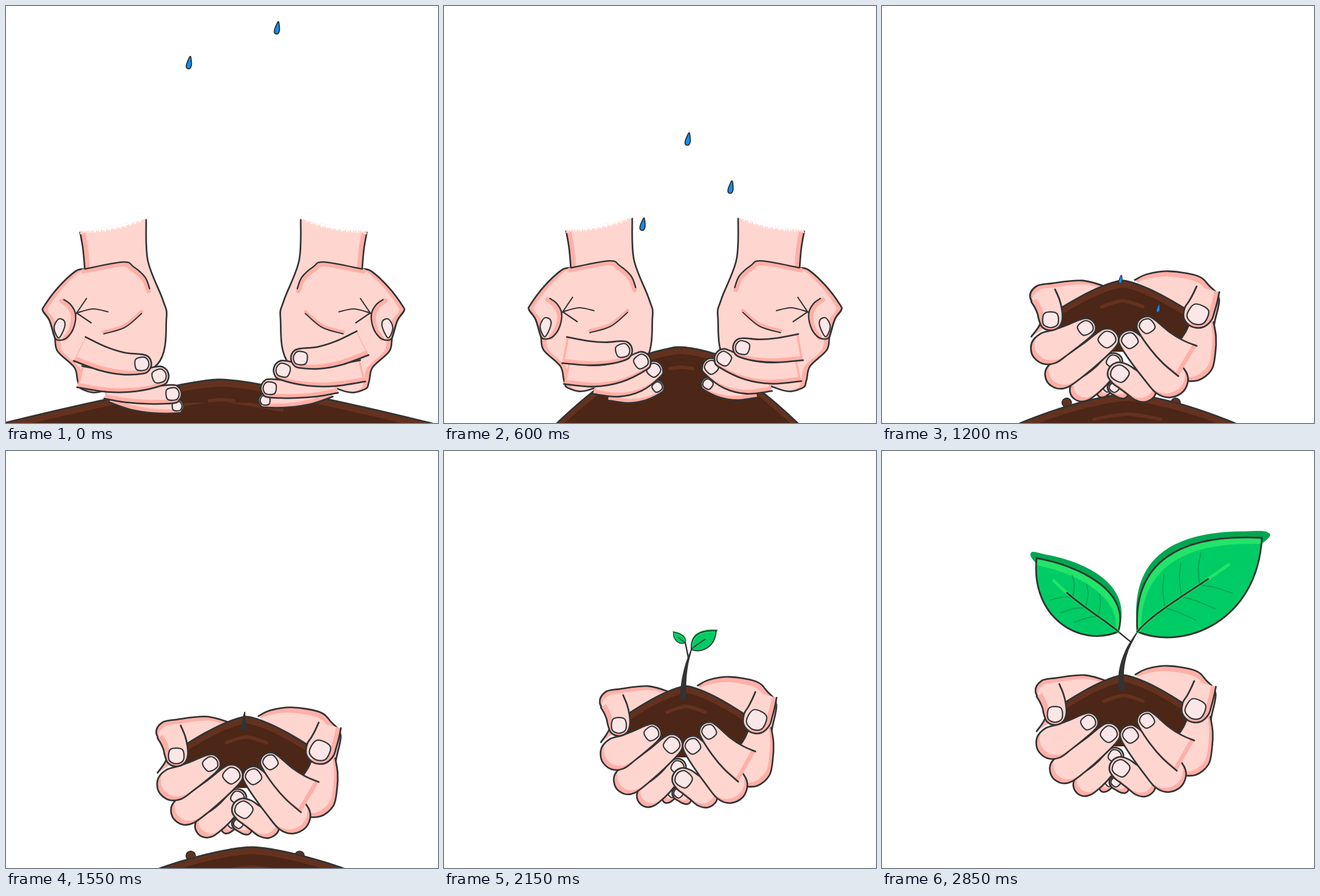
An HTML page with a canvas that plays this animation: 746x720 px, repeating every 3000 ms.

```html
<!DOCTYPE html>
<html lang="en">
<head>
<meta charset="utf-8">
<title>Seedling</title>
<style>
html, body { margin: 0; width: 100%; height: 100%; overflow: hidden; background: #fff; }
canvas { display: block; width: 100vw; height: 100vh; }
</style>
</head>
<body>
<canvas id="stage" width="746" height="720"></canvas>
<script>
const ctx = document.getElementById('stage').getContext('2d');
const INK = '#333', SKIN = '#ffd5cf', BLUSH = '#ffafa7', NAIL = '#fbe7e8';
const SOIL = '#4c2616', CLAY = '#63321f';
const GREEN = '#00cc66', LIME = '#22e468', PINE = '#00a651', BLUE = '#0a90ff';
const Q = Math.PI / 2;

// ---- time and geometry
const mix = (a, b, u) => a + (b - a) * u;
const mixPt = (a, b, u) => a.map((v, i) => mix(v, b[i], u));
const clamp = u => Math.max(0, Math.min(1, u));
const span = (n, f) => Array.from({ length: n + 1 }, (_, i) => f(i / n));
const parse = s => s.split(' ').map(p => p.split(',').map(Number));

// keys are [time, ...values]
function track(t, keys) {
  let i = 0;
  while (i < keys.length - 2 && t >= keys[i + 1][0]) i++;
  const [a, b] = [keys[i], keys[i + 1]];
  return mixPt(a, b, clamp((t - a[0]) / (b[0] - a[0]))).slice(1);
}

// smooth path through points
function curve(pts, closed) {
  const n = pts.length, path = new Path2D();
  const at = i => closed ? pts[(i + n) % n] : pts[Math.max(0, Math.min(n - 1, i))];
  path.moveTo(...pts[0]);
  for (let i = 0; i < (closed ? n : n - 1); i++) {
    const [a, b, c, d] = [at(i - 1), at(i), at(i + 1), at(i + 2)];
    path.bezierCurveTo(b[0] + (c[0] - a[0]) / 6, b[1] + (c[1] - a[1]) / 6,
      c[0] - (d[0] - b[0]) / 6, c[1] - (d[1] - b[1]) / 6, ...c);
  }
  if (closed) path.closePath();
  return path;
}

function cubic([a, b, c, d], u) {
  const v = 1 - u;
  return a.map((_, i) => v * v * v * a[i] + 3 * v * v * u * b[i] + 3 * v * u * u * c[i] + u * u * u * d[i]);
}

// ---- painting
function line(pts, width = 2.5, color = INK) {
  ctx.strokeStyle = color;
  ctx.lineWidth = width;
  ctx.stroke(curve(pts));
}

// the shade shows where the fill, moved by shift, leaves the shape uncovered
function solid(path, fill, { shade = fill, shift = [0, 0], width = 2.8 } = {}) {
  ctx.save();
  ctx.fillStyle = shade;
  ctx.fill(path);
  ctx.clip(path);
  ctx.translate(...shift);
  ctx.fillStyle = fill;
  ctx.fill(path);
  ctx.restore();
  ctx.strokeStyle = INK;
  ctx.lineWidth = width;
  if (width) ctx.stroke(path);
}

function placed(transform, draw) {
  ctx.save();
  transform();
  draw();
  ctx.restore();
}

// point on the rim of a tube whose spine runs through root, middle and tip
function rimOf([ax, ay, mx, my, bx, by], [r0, r1]) {
  const c = [2 * mx - (ax + bx) / 2, 2 * my - (ay + by) / 2];
  return (u, angle, k = 1) => {
    const p = mixPt([ax, ay], c, u), q = mixPt(c, [bx, by], u), [x, y] = mixPt(p, q, u);
    const heading = Math.atan2(q[1] - p[1], q[0] - p[0]) + angle, r = k * mix(r0, r1, u);
    return [x + r * Math.cos(heading), y + r * Math.sin(heading)];
  };
}

function tube(rim, capped) {
  const pts = [...span(3, u => rim(u, -Q)), rim(1, -Q / 2), rim(1, 0), rim(1, Q / 2), ...span(3, u => rim(1 - u, Q))];
  if (capped) pts.push(rim(0, 1.5 * Q), rim(0, 2 * Q), rim(0, 2.5 * Q));
  return curve(pts, capped);
}

function finger(spine, radii, { capped = false, nail = true, lean = 5 } = {}) {
  const rim = rimOf(spine, radii);
  solid(tube(rim, capped), SKIN, { shade: BLUSH, shift: [lean, -7] });
  if (nail) solid(curve([-2.4, -1, 0, 1, 2.4].map(a => rim(1, a, .75)), true), NAIL, { width: 2.2 });
}

// heap of soil: its sides fall away as a power of the distance from the top
function mound([x, top, half, drop, power], bottom) {
  const ridge = (lift, k) => span(16, u => {
    const v = 2 * u - 1;
    return [x + half * k * v, top + lift + drop * Math.abs(k * v) ** power];
  });
  const path = curve(ridge(0, 1)), body = new Path2D(path);
  body.lineTo(x + half, bottom);
  body.lineTo(x - half, bottom);
  solid(body, SOIL, { shade: CLAY, shift: [0, 12], width: 0 });
  line(ridge(35, .3), 6, CLAY);
  ctx.strokeStyle = INK;
  ctx.lineWidth = 3;
  ctx.stroke(path);
}

// ---- the open hands; the right one mirrors the left
const PALM = parse('128,391 133,420 136,454 136,454 120,458 90,486 66,518 64,527 75,543 84,572 89,596 118,624 124,648 132,662 170,664 262,618 277,540 271,508 245,440 242,369');
const KNUCKLE = parse('136,454 202,442 220,450 240,468 248,488');
const CREASES = ['169,566 205,555 234,531', '176,528 150,523 122,530 122,530 139,505', '122,530 147,547'].map(parse);
const THUMB = parse('100,507 112,516 120,532 117,555 106,572 93,577 84,572 75,543 64,527');
const THUMB_NAIL = parse('83,556 90,541 100,543 101,555 91,573');

// palm offset, then the mirror sums of palm and fingers and the lift of the mirrored fingers
const HANDS = [[0, 0, 0, 751, 743, -10], [600, 83, -2, 833, 824, -5], [900, 98, 1, 831, 813, -4]];
// little finger first: radii, then root, middle and tip at each time
const FINGERS = [
  [[9, 12], [0, 182, 676, 235, 690, 295, 691], [600, 285, 672, 330, 674, 368, 658], [900, 272, 667, 330, 675, 371, 662]],
  [[12, 16], [0, 172, 666, 225, 672, 287, 670], [600, 260, 658, 318, 658, 362, 629], [900, 268, 657, 327, 652, 369, 622]],
  [[19, 17], [0, 127, 640, 200, 649, 264, 639], [600, 211, 634, 280, 637, 340, 614], [900, 222, 634, 290, 632, 339, 600]],
  [[23, 17], [0, 127, 592, 185, 614, 234, 618], [600, 208, 594, 265, 600, 308, 595], [900, 222, 605, 278, 599, 317, 575]]
];

function palm() {
  solid(curve(PALM), SKIN, { shade: BLUSH, shift: [9, 0] });
  line(KNUCKLE.map(([x, y]) => [x - 2, y + 4]), 8, BLUSH);
  line(KNUCKLE);
  line(CREASES[0].map(([x, y]) => [x, y - 3]), 6, BLUSH);
  CREASES.forEach(c => line(c, 2.2));
  line(THUMB.slice(0, 5).map(([x, y]) => [x - 4, y + 2]), 8, BLUSH);
  line(THUMB);
  solid(curve(THUMB_NAIL, true), NAIL, { width: 2.2 });
  // ragged upper end of the wrist
  const [a, b] = [PALM[0], PALM[PALM.length - 1]], edge = new Path2D();
  edge.moveTo(...a);
  edge.quadraticCurveTo((a[0] + b[0]) / 2, a[1] + 3, ...b);
  ctx.fillStyle = '#fff';
  ctx.fill(edge);
  ctx.strokeStyle = SKIN;
  ctx.lineWidth = 6;
  ctx.lineCap = 'butt';
  ctx.setLineDash([3, 1, 2, 3]);
  ctx.stroke(edge);
}

function openHands(t) {
  const [dx, dy, palmSum, fingerSum, lift] = track(t, HANDS), u = clamp((t - 900) / 200);
  const pair = (sum, rise, draw) => [false, true].forEach(mirrored => placed(() => {
    if (mirrored) {
      ctx.translate(sum, rise);
      ctx.scale(-1, 1);
    }
    ctx.translate(36 * u, 10 * u);
  }, draw));
  pair(palmSum, 0, () => placed(() => ctx.translate(dx, dy), palm));
  mound(track(t, [[0, 372, 645, 70, 9, 1.5], [600, 410, 589, 66, 14, 1.5],
    [900, 410, 530, 78, 31, 1.5], [1100, 408, 495, 68, 53, 1.5]]), 685);
  pair(fingerSum, lift, () => FINGERS.forEach(([radii, ...keys]) => finger(track(t, keys), radii)));
}

// ---- the cupped hands
const BACKS = ['392,445 350,433 300,438 276,443 266,462 284,500 268,530',
  '435,432 455,422 490,417 536,425 555,442 571,465 563,510 560,560'].map(parse);
// root, middle, tip, radii
const CUP_LEFT = [
  [382, 627, 386, 624, 391, 619, 8, 9],
  [350, 622, 376, 602, 400, 573, 20, 15],
  [315, 595, 352, 569, 390, 535, 25, 19],
  [295, 550, 325, 534, 355, 515, 28, 17]
];
const CUP_RIGHT = [
  [415, 628, 409, 624, 402, 618, 9, 11],
  [448, 621, 430, 608, 411, 594, 22, 20],
  [490, 604, 457, 572, 427, 537, 31, 18],
];

function cuppedHands(t) {
  const [dx, dy, wide] = track(t, [[1400, 0, 41, 1.07], [1800, 0, 0, 1], [2150, 3, -27, 1],
    [2500, 3, -43, 1.02], [2850, 2, -46, 1.02]]);
  const gap = t < 1200 ? 8 : 0;
  const digits = (list, lean) => list.forEach(d => finger(d.slice(0, 6), d.slice(6), { capped: true, lean }));
  const left = draw => placed(() => ctx.translate(-gap, 0), draw);
  const right = draw => placed(() => ctx.translate(gap, 0), draw);
  placed(() => {
    ctx.translate(412 + dx, dy);
    ctx.scale(wide, 1);
    ctx.translate(-412, 0);
  }, () => {
    left(() => solid(curve(BACKS[0]), SKIN, { shade: BLUSH, shift: [4, 7] }));
    right(() => solid(curve(BACKS[1]), SKIN, { shade: BLUSH, shift: [-4, 9] }));
    mound([415, 433, 110, 55, 1.4], 556);
    left(() => {
      digits(CUP_LEFT, 6);
      finger([287, 459, 296, 480, 299, 500], [22, 19], { lean: 8 });
    });
    right(() => {
      finger([543, 505, 539, 537, 526, 570], [19, 37], { nail: false, lean: -6 });
      finger([553, 448, 546, 470, 537, 491], [19, 24], { lean: -7 });
      digits(CUP_RIGHT, -5);
      finger([520, 572, 486, 547, 455, 512], [30, 17], { lean: -4 });
    });
  });
}

// ---- the plant
// upper and lower edge of each leaf from foot to tip; side is where the tip points
const LEAVES = [
  { side: -1, grow: 1.2, upper: '408,312 430,240 337,197 267,185', lower: '408,312 340,340 256,286 267,185' },
  { side: 1, grow: 1, upper: '441,312 432,192 514,142 656,150', lower: '441,312 520,345 648,296 656,150' }
].map(l => ({ ...l, upper: parse(l.upper), lower: parse(l.lower) }));

function leaf({ side, upper, lower }, foot, s) {
  const up = u => cubic(upper, u), low = u => cubic(lower, u), rib = u => mixPt(up(u), low(u), .5);
  const bold = Math.min(9, 3 / s), [root, c1, c2, tip] = upper;
  const push = ([x, y], dx, dy) => [x + side * dx, y + dy];
  placed(() => {
    ctx.translate(...foot);
    ctx.scale(s, s);
    ctx.translate(-root[0], -root[1]);
  }, () => {
    const fold = [root, push(c1, -8, -12), push(c2, -8, -12), push(tip, 9, -10)];
    ctx.fillStyle = PINE;
    ctx.fill(curve([...span(12, u => cubic(fold, u)), push(tip, 0, 10), rib(.5)]));
    const blade = new Path2D();
    blade.moveTo(...root);
    blade.bezierCurveTo(...c1, ...c2, ...tip);
    blade.bezierCurveTo(...lower[2], ...lower[1], ...root);
    solid(blade, GREEN, { shade: LIME, shift: [7 * side, 11], width: bold });
    for (const u of s > .4 ? [.3, .43, .56] : []) {
      for (const edge of [up, low]) {
        const end = mixPt(rib(u + .12), edge(u + .12), .7);
        line([rib(u), push(mixPt(rib(u), end, .5), -3, -3), end], 2, PINE);
      }
    }
    line(span(8, u => rib(u * .76)), 5, LIME);
    line(span(8, u => rib(u * .62)), bold);
  });
}

function plant(t) {
  const spine = track(t, [[1450, 411, 492, 411, 483, 411, 474], [1800, 410, 454, 411, 425, 415, 394],
    [2150, 413, 429, 416, 385, 427, 343], [2650, 414, 413, 417, 362, 441, 312]]);
  const rim = rimOf(spine, [6, 1]), foot = spine.slice(4);
  ctx.fillStyle = INK;
  ctx.fill(tube(rim));
  const [s] = track(t, [[2050, 0], [2150, .2], [2500, .88], [2700, 1.02], [2850, 1]]);
  if (!s) return;
  const twig = [mix(419, 408, s), mix(336, 312, s)];
  line([rim(.82, 0, 0), twig], 2.5);
  leaf(LEAVES[0], twig, s ** LEAVES[0].grow);
  leaf(LEAVES[1], foot, s);
}

// ---- rain and ground
// time, x, y, size
const DROPS = [
  [[0, 316, 98, 1], [600, 343, 377, 1], [900, 345, 502, 1], [1000, 346, 540, .6]],
  [[0, 468, 38, 1], [600, 495, 313, 1], [900, 485, 403, 1], [1200, 477, 522, .65]],
  [[50, 428, -20, 1], [600, 421, 230, 1], [900, 416, 342, 1], [1200, 412, 472, .65]]
];
const DROP = curve(parse('2,-11 4,-3 4,5 1,10 -4,9 -4,2'), true);

function rain(t) {
  for (const keys of DROPS) {
    if (t < keys[0][0] || t > keys[keys.length - 1][0]) continue;
    const [x, y, size] = track(t, keys);
    placed(() => {
      ctx.translate(x, y);
      ctx.scale(size, size);
    }, () => solid(DROP, BLUE, { width: 2 }));
  }
}

function ground(t) {
  const heap = track(t, [[0, 365, 645, 372, 76, 1.2], [600, 403, 589, 212, 135, 1.5], [900, 424, 681, 214, 41, 2.2],
    [1200, 424, 670, 192, 53, 1.5], [1400, 424, 670, 192, 53, 1.5], [1800, 424, 707, 115, 14, 1.5], [1950, 424, 728, 115, 14, 1.5]]);
  if (t >= 1150) {
    for (const x of [319, 507]) {
      const clod = new Path2D();
      clod.arc(x, heap[1] + 15, 8, 0, 4 * Q);
      solid(clod, CLAY, { width: 2 });
    }
  }
  mound(heap, 760);
}

function draw(t) {
  ctx.fillStyle = '#fff';
  ctx.fillRect(0, 0, 746, 720);
  ctx.lineCap = ctx.lineJoin = 'round';
  if (t < 1950) ground(t);
  (t < 1150 ? openHands : cuppedHands)(t);
  if (t >= 1450) plant(t);
  rain(t);
}

// the picture changes every 50 ms, with a few longer rests
const RESTS = [[1200, 1300], [1300, 1450], [2700, 2850], [2850, 3000]];
const start = performance.now();
function frame(now) {
  const t = Math.floor(Math.max(0, now - start) % 3000 / 50) * 50;
  const rest = RESTS.find(([from, to]) => t >= from && t < to);
  draw(rest ? rest[0] : t);
  requestAnimationFrame(frame);
}
frame(start);
</script>
</body>
</html>
```
